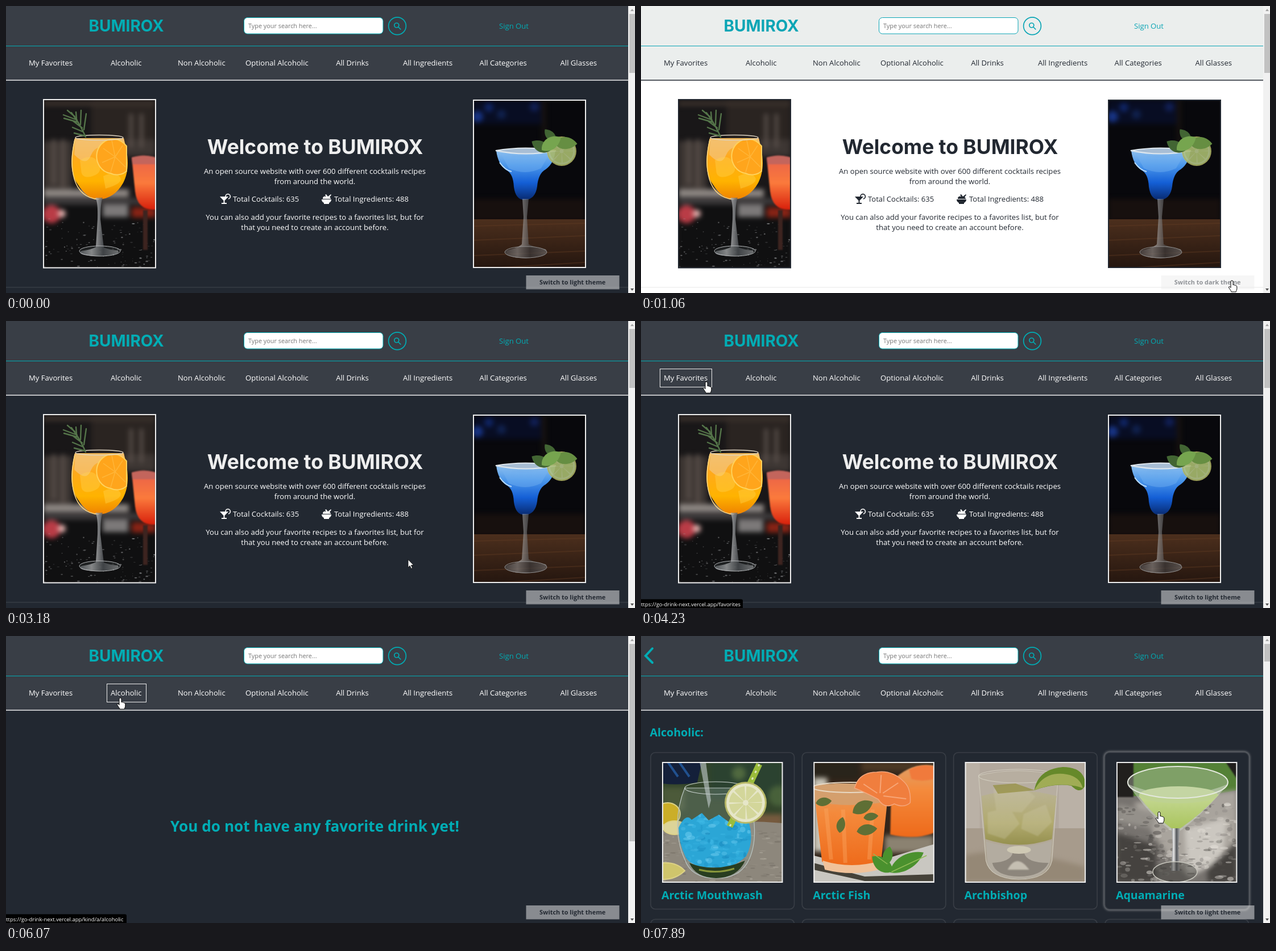
Recreate the animation shown at these times as an HTML page. Size 1106 by 506 pixels, loop 8000 ms.

```html
<!DOCTYPE html>
<html lang="en">
<head>
<meta charset="utf-8">
<title>Cocktail site demo</title>
<style>
html, body { margin: 0; width: 100%; height: 100%; overflow: hidden; }
#stage {
  --head: #393e46; --body: #222831; --ink: #eee; --text: #fff; --accent: #00adb5; --rule: #41464e;
  display: block; font: 13.1px "Open Sans", sans-serif;
}
#stage.light { --head: #ebeeed; --body: #fff; --ink: #222831; --text: #222831; --accent: #0aa5b5; --rule: #e8e8e8; }
.head { fill: var(--head); }
.body { fill: var(--body); }
.ink { fill: var(--ink); }
.text { fill: var(--text); }
.accent { fill: var(--accent); }
.line { fill: none; stroke: var(--accent); stroke-width: 1.7; }
.frame { fill: none; stroke: var(--ink); stroke-width: 2; }
.mid { text-anchor: middle; }
.brand { font: 700 28px Inter, sans-serif; }
.title { font: 700 35.4px Inter, sans-serif; }
.bold { font-weight: 700; font-size: 19.6px; }
.notice { font-weight: 700; font-size: 26.2px; }
.blur { filter: blur(4px); }
.soft { filter: blur(1.2px); }
.glow { fill: none; stroke: #b4b4b4; stroke-width: 3.5; filter: blur(2px); opacity: .8; }
</style>
</head>
<body>
<svg id="stage" width="1106" height="506" viewBox="0 0 1106 506">
  <defs>
    <linearGradient id="amber" x2="0" y2="1">
      <stop stop-color="#f3b95a"/><stop offset=".3" stop-color="#ffa91c"/><stop offset=".7" stop-color="#ffb300"/><stop offset="1" stop-color="#ee8200"/>
    </linearGradient>
    <linearGradient id="azure" x2="0" y2="1">
      <stop stop-color="#8fc0ee"/><stop offset=".3" stop-color="#4a96ea"/><stop offset=".65" stop-color="#145fd6"/><stop offset="1" stop-color="#082a70"/>
    </linearGradient>
    <linearGradient id="red" x2="0" y2="1">
      <stop stop-color="#e8604a"/><stop offset=".5" stop-color="#fb7a3c"/><stop offset="1" stop-color="#d8200c"/>
    </linearGradient>
    <linearGradient id="wood" x2="0" y2="1">
      <stop stop-color="#4c2f1d"/><stop offset="1" stop-color="#25160f"/>
    </linearGradient>
    <linearGradient id="peach" x2="0" y2="1">
      <stop stop-color="#e0a068"/><stop offset=".35" stop-color="#f48a3c"/><stop offset="1" stop-color="#ee6a1a"/>
    </linearGradient>
    <linearGradient id="lime" x2="0" y2="1">
      <stop stop-color="#cbdca0"/><stop offset="1" stop-color="#a9c45c"/>
    </linearGradient>
    <linearGradient id="olive" x2="0" y2="1">
      <stop stop-color="#b9b293"/><stop offset=".6" stop-color="#b1aa6e"/><stop offset="1" stop-color="#95904f"/>
    </linearGradient>
    <linearGradient id="stem">
      <stop stop-color="#777b80"/><stop offset=".3" stop-color="#e6e6e6"/><stop offset=".6" stop-color="#55585c"/><stop offset="1" stop-color="#b5b5b5"/>
    </linearGradient>
    <path id="leaf" d="M0 0C6-16 26-20 40-6C30 8 12 12 0 0Z"/>
    <clipPath id="slush"><path d="M29 116Q42 89 52 102L70 90 82 103 100 93 124 111 137 85 152 105Q163 138 148 166Q124 190 92 186Q55 188 42 169Q29 143 29 116Z"/></clipPath>
    <g id="slice">
      <circle r="37" fill="#b9b968"/><circle r="34" fill="#e6e6c8"/>
      <circle r="17" fill="none" stroke="#d3d69a" stroke-width="24" stroke-dasharray="11.4 2"/>
    </g>
  </defs>

  <rect class="body" width="1095" height="506"/>
  <rect class="head" width="1095" height="130"/>
  <rect class="accent" y="70" width="1095" height="1"/>
  <rect class="ink" y="130" width="1095" height="1.500"/>
  <text class="brand accent mid" x="211.5" y="45">BUMIROX</text>
  <rect x="418.500" y="20.500" width="244.500" height="28.500" rx="6" fill="#fff" stroke="var(--accent)"/>
  <text x="426" y="39" font-size="10.85" fill="#757575">Type your search here...</text>
  <circle class="line" cx="688" cy="35.200" r="15.400"/>
  <circle class="line" cx="686.800" cy="34" r="4"/>
  <path class="line" d="M689.800 37l4 4" stroke-linecap="round"/>
  <text class="accent" x="867" y="40">Sign Out</text>
  <g id="nav" class="text mid"></g>
  <rect id="navBox" y="84.500" height="32" fill="none" stroke="#eee"/>

  <g id="home">
    <svg x="66" y="165" width="197" height="297" viewBox="66 165 197 297">
      <rect x="66" y="165" width="197" height="297" fill="#191718"/>
      <g class="blur">
        <path d="M150 165h113v90H150z" fill="#2a2421"/>
        <path d="M66 172h197" stroke="#39302b" stroke-width="9"/>
        <path d="M66 238h50v95H66zM208 235h55v30h-55z" fill="#3d3633"/>
        <path d="M84 235v80M100 235v85M220 190v60M238 190v60" stroke="#5a504b" stroke-width="6"/>
        <path d="M66 323h150v14H66z" fill="#8d8783"/>
        <path d="M66 339h197v13H66z" fill="#3e3b3c"/>
        <path d="M66 350h197v112H66z" fill="#101011"/>
        <circle cx="80" cy="367" r="16" fill="#b93c46"/><circle cx="98" cy="366" r="7" fill="#e3b1ae"/>
        <path d="M170 350h45v22h-45z" fill="#7c7979"/>
        <path d="M221 355h42v18h-42z" fill="#872315"/>
      </g>
      <g id="counter"></g>
      <g class="soft">
        <path d="M221 267q22-5 42 0v92q-32 2-36-32z" fill="url(#red)"/>
        <path d="M221 267q22-7 42 0v12h-41z" fill="#c3655c"/>
        <path d="M241 360h8v70h-8z" fill="#3d2420"/>
      </g>
      <path d="M121 233C112 270 113 295 126 314Q143 341 163 341Q190 340 206 312C218 288 215 263 207 233Z" fill="url(#amber)"/>
      <path d="M122 233q42 9 85 0l2 13q-16 12-34 5t-26 13-29-2z" fill="#f4c376" opacity=".75"/>
      <path d="M130 272q22-14 32 4t-10 24-20-12zM171 300q20-10 29 1t-25 21z" fill="#ffd24e" opacity=".4"/>
      <path d="M212 247v44a25 25 0 0 1-28 4a27 29 0 0 1 7-60q11 0 21 12z" fill="#ffa51c" stroke="#ffd25c" stroke-width="2"/>
      <path d="M192 266l-21-15M192 266l-23 10M192 266l-8 27M192 266l18 18M192 266l13-20M192 266l-6-29" stroke="#ffc14c" stroke-width="1.500" opacity=".6"/>
      <ellipse cx="164" cy="232" rx="42" ry="4.500" fill="none" stroke="#ded4c2" stroke-width="1.400"/>
      <path d="M121 235C110 285 116 337 163 341" fill="none" stroke="#ffd782" stroke-width="1.500"/>
      <path d="M140 231Q132 211 115 188M134 215l-17-13M136 222l-19-8M131 209l1-25M125 201l-24-9M121 195l-13-11M137 218l4-28M127 205l-25-7M139 229l-19-5M124 199l-1-12" fill="none" stroke="#547449" stroke-width="2.400" stroke-linecap="round"/>
      <path d="M157 338h13q-4 8-4 38l6 50q10 4 25 5q7 8-35 10q-39-1-30-9q17-2 26-7l3-49q1-31-4-38z" fill="url(#stem)" opacity=".8"/>
      <ellipse cx="165" cy="432" rx="36" ry="9" fill="#33373a" fill-opacity=".4" stroke="#b5b8ba"/>
    </svg>
    <rect class="frame" x="66" y="165" width="197" height="296.500"/>

    <svg x="822" y="166" width="197" height="295" viewBox="822 166 197 295">
      <rect x="822" y="166" width="197" height="295" fill="#08080c"/>
      <g class="blur">
        <path d="M822 166h120v42H822z" fill="#080d23"/>
        <circle cx="829" cy="195" r="10" fill="#173383"/><circle cx="849" cy="179" r="8" fill="#0f2464"/>
        <circle cx="871" cy="191" r="8" fill="#10214e"/><circle cx="929" cy="178" r="8" fill="#111f55"/>
        <path d="M942 166h8v100h-8z" fill="#17120f"/>
        <path d="M822 340h197v40H822z" fill="#17100e"/>
      </g>
      <path d="M822 376h197v85H822z" fill="url(#wood)"/>
      <path d="M822 388l197-5M822 413l197-8M822 440l197-8M870 461l149-9" stroke="#633d24" stroke-width="2" opacity=".4"/>
      <path d="M862 255Q865 279 879 289Q892 295 893 319Q896 342 912 342Q931 341 934 318Q936 295 949 288Q964 277 966 255Z" fill="url(#azure)"/>
      <path d="M870 260q39 14 86 0l-15 26q-28 14-57 0z" fill="#79b5f0" opacity=".4"/>
      <path d="M861 255Q913 246 967 255Q914 266 861 255Z" fill="#a8bed5" stroke="#e0e8ee" stroke-width="2"/>
      <path d="M868 276q9 13 21 16" fill="none" stroke="#bcdcf8" stroke-width="2"/>
      <path d="M908 340h11l-3 32 3 48q8 5 30 9q10 13-35 16q-41-2-36-14q22-4 29-11l3-48z" fill="url(#stem)" opacity=".55"/>
      <ellipse cx="914" cy="434" rx="37" ry="10" fill="#271f1d" fill-opacity=".4" stroke="#8f8e8e"/>
      <g transform="translate(977 256) scale(.7)"><use href="#slice" opacity=".85"/><circle r="35" fill="#799944" opacity=".48"/></g>
      <g fill="#426533">
        <use href="#leaf" transform="translate(967 238) rotate(-125) scale(.7)"/><use href="#leaf" transform="translate(957 255) rotate(-145) scale(.9)"/>
        <use href="#leaf" transform="translate(964 242) rotate(10)" fill="#668e42"/><use href="#leaf" transform="translate(942 254) rotate(-25)" fill="#76a54f"/>
      </g>
    </svg>
    <rect class="frame" x="822" y="166" width="197" height="295"/>
    <text class="title ink mid" x="543.500" y="261">Welcome to BUMIROX</text>
    <g class="text">
      <g class="mid">
        <text x="543" y="296">An open source website with over 600 different cocktails recipes</text>
        <text x="543" y="314">from around the world.</text>
        <text x="543" y="377">You can also add your favorite recipes to a favorites list, but for</text>
        <text x="543" y="395">that you need to create an account before.</text>
      </g>
      <text x="399" y="345">Total Cocktails: 635</text>
      <text x="577" y="345">Total Ingredients: 488</text>
      <path d="M376 336h15l-6.500 7v4h3.500v2h-9v-2h3.500v-4z"/>
      <path d="M386 336a4.200 4.200 0 1 1 5 4" fill="none" stroke="var(--ink)" stroke-width="1.800"/>
      <path d="M555 341h17q0 4-4 6v2h-9v-2q-4-2-4-6zM557 340a4 4 0 0 1 6-4l-2-3 2-1 3 4 5-4 1 1-3 4q2 1 2 3z"/>
    </g>
    <rect y="495.500" width="1095" height="1" fill="var(--rule)"/>
  </g>

  <text id="favorites" class="notice accent mid" x="543" y="345">You do not have any favorite drink yet!</text>

  <g id="list">
    <path d="M20 22L8 35L20 47" fill="none" stroke="var(--accent)" stroke-width="4" stroke-linecap="round"/>
    <text class="accent bold" x="15.500" y="177">Alcoholic:</text>
    <g id="cards"></g>
    <svg x="37" y="222" width="212" height="212">
      <path d="M0 0h212v212H0z" fill="#33452b"/>
      <g class="blur">
        <path d="M85 0h127v65H85z" fill="#2b4230"/><circle cx="135" cy="20" r="12" fill="#50693f"/><circle cx="205" cy="60" r="18" fill="#48613a"/>
        <path d="M0 45h40v40H0z" fill="#4c5a3a"/><path d="M150 92h62v30h-62z" fill="#765a3e"/>
      </g>
      <path d="M0 0h70l-8 36q-32 6-62 2z" fill="#14203a"/><path d="M10 0l18 26M30 0l18 26" stroke="#21518f" stroke-width="4"/>
      <path d="M0 122Q100 98 212 108V212H0z" fill="#8d877c"/>
      <g id="cloth"></g>
      <g fill="#cbae28" stroke="#ddd286" stroke-width="2"><ellipse cx="10" cy="92" rx="22" ry="20"/><ellipse cx="22" cy="116" rx="20" ry="12" fill="#dcd498"/><path d="M0 178q26-2 40 14q-17 16-40 15z" fill="#cfc56c"/></g>
      <path d="M40 46C24 85 22 133 40 172Q51 205 96 205Q138 205 153 172C170 135 162 85 148 46Z" fill="#8fa39c" fill-opacity=".28" stroke="#b9c5c2" stroke-width="1.200"/>
      <g clip-path="url(#slush)"><path d="M0 60h212v140H0z" fill="#2ba6d6"/><g id="ice"></g></g>
      <path d="M48 178q45 19 98-4q-13 30-51 31-36-1-47-27z" fill="#283d20"/><path d="M65 190q32 8 62-2" stroke="#88963b" stroke-width="3" fill="none"/>
      <ellipse cx="94" cy="46" rx="54" ry="11" fill="none" stroke="#c9d2ce" stroke-width="1.200"/>
      <path d="M66 0h11l4 30 5 38-4 14-6-30z" fill="#c3cdce" opacity=".6"/>
      <path d="M171 4L119 114" stroke="#9abc3b" stroke-width="11"/><path d="M171 4L119 114" stroke="#dfe8bf" stroke-width="3" stroke-dasharray="4 9"/>
      <use href="#slice" x="147" y="72"/>
    </svg>
    <svg x="303.300" y="222" width="212" height="212">
      <path d="M0 0h212v212H0z" fill="#33251a"/>
      <g class="blur"><path d="M0 0h80v30H0z" fill="#29241b"/><path d="M85 0h127v16H85z" fill="#4c3925"/><path d="M0 28h24v130H0z" fill="#c9c5b8"/><path d="M125 130h87v30h-87z" fill="#8b8271"/></g>
      <path d="M0 165L80 185 212 145V212H0z" fill="#c9c7c1"/><path d="M0 190l90 20h122v-12L90 202 0 178z" fill="#454239"/>
      <path class="soft" d="M137 35Q170 0 212 7V125Q180 138 135 128Z" fill="url(#peach)"/>
      <path class="soft" d="M168 14Q190 2 212 8V30Q190 36 172 30Z" fill="#f07a3c"/>
      <path d="M0 43Q62 31 132 48L119 175Q65 194 15 176Z" fill="url(#peach)"/>
      <path d="M0 43Q62 31 132 48L128 70Q65 82 2 70Z" fill="#d0a273" opacity=".8"/>
      <path d="M22 82l9 90M52 84l4 94M104 84l-6 88" stroke="#fba863" stroke-width="7" opacity=".4"/>
      <ellipse cx="65" cy="45" rx="67" ry="9" fill="none" stroke="#e8d9c4" stroke-width="2"/>
      <path d="M16 174q52 16 102 0l-3 16q-47 12-95 0z" fill="#f0c29a"/>
      <path d="M72 46Q80 18 111 18Q138 14 158 34Q172 46 170 72Q159 82 142 74Q125 84 114 66Q92 54 72 46Z" fill="#f07e3e" stroke="#f5a67c" stroke-width="1.500"/>
      <path d="M112 55l-24-16M117 55l2-32M122 55l27-18M123 60l40 5" stroke="#f7a677" stroke-width="2"/>
      <g fill="#5f6f35"><use href="#leaf" transform="translate(4 73) scale(.7)"/><use href="#leaf" transform="translate(69 90) rotate(-20)"/><use href="#leaf" transform="translate(88 99) scale(.65)"/><use href="#leaf" transform="translate(46 125) rotate(-70) scale(.7)"/><use href="#leaf" transform="translate(76 123) scale(.9)"/></g>
      <g fill="#4a912e"><use href="#leaf" transform="translate(135 195) rotate(-25) scale(1.700 1.200)"/><use href="#leaf" transform="translate(139 193) rotate(-135) scale(1.100)"/><use href="#leaf" transform="translate(128 181) rotate(-70) scale(.8)"/></g>
      <path d="M137 194l62-29M130 180l-25-18" stroke="#91bc57" stroke-width="1.500"/>
    </svg>
    <svg x="569.600" y="222" width="212" height="212">
      <path d="M0 0h212v212H0z" fill="#b2a89d"/><path d="M0 0h26v117H0zM165 40h47v77h-47z" fill="#bab1a6"/>
      <path d="M0 117h212v95H0z" fill="#a79b8c"/><path class="blur" d="M0 165q70-20 212 20v27H0z" fill="#958876"/>
      <path d="M24 24Q92 7 164 24L153 174Q146 207 94 207Q44 205 37 174Z" fill="#bdb5a4" fill-opacity=".5" stroke="#cdc8ba" stroke-width="1.200"/>
      <path d="M29 60Q94 42 161 60L153 136Q95 156 36 136Z" fill="url(#olive)"/>
      <g class="soft" fill="#cfcaaa" opacity=".3">
        <path d="M50 48l43-10 31 23-24 28-45-3zM40 89l38-9 18 29-26 27-30-10zM103 92l39-17 11 31-25 25-29-13z"/>
      </g>
      <path d="M49 41l40-3 34 12-65 6z" fill="#938d3c" opacity=".7"/>
      <ellipse cx="94" cy="25" rx="70" ry="12" fill="none" stroke="#d3cec0" stroke-width="1.200"/>
      <path d="M37 140q58 18 116-1l-3 36q-8 31-56 32-50-3-55-32z" fill="#b3aca0"/>
      <path d="M48 178Q81 176 84 160h20q4 18 43 18q-12 24-52 24-42-1-47-24z" fill="#8d867c"/><path class="soft" d="M75 190q16-30 38 0z" fill="#c5bfb2"/>
      <ellipse cx="95" cy="155" rx="21" ry="7" fill="#cfc9b4"/>
      <path d="M122 50Q128 13 172 9Q210 9 212 40Q204 59 187 42Q158 37 122 50Z" fill="#66892a"/><path d="M122 50Q138 18 173 21Q202 24 207 46Q166 32 122 50Z" fill="#a0ac55"/>
    </svg>
    <svg x="835.900" y="222" width="212" height="212">
      <path d="M0 0h212v212H0z" fill="#77736f"/><path d="M0 0h212v50L110 70 0 56z" fill="#548136"/><path class="soft" d="M0 0h30v62H0zM192 0l20 30V0z" fill="#211f1d"/>
      <g class="blur"><path d="M30 72L212 50V150L130 205 90 165z" fill="#a9a49d"/><path d="M120 118l75-20-10 80-60 22z" fill="#cbc7c0"/><path d="M0 125l70 22v65H0zM160 190l52-50v72h-52z" fill="#45423f"/><path d="M4 75l65 15-5 28-64-13z" fill="#94908a"/></g>
      <g id="wicker"></g>
      <path d="M20 39Q58 94 96 121H113Q155 90 196 39Q109 76 20 39Z" fill="#ccd6c4" opacity=".55"/>
      <path d="M39 60Q107 31 180 58Q150 91 114 116Q104 123 94 115Q62 91 39 60Z" fill="url(#lime)"/>
      <ellipse cx="109" cy="58" rx="69" ry="15" fill="#bed291"/>
      <ellipse cx="108" cy="36" rx="88" ry="28" fill="#cfdbc4" fill-opacity=".35" stroke="#e4e8de" stroke-width="2"/>
      <path d="M97 117h15l-3 30 2 45H96l3-45z" fill="url(#stem)"/><ellipse cx="103" cy="194" rx="39" ry="18" fill="#393833" fill-opacity=".45" stroke="#c7c6bd" stroke-width="1.500"/>
    </svg>
    <g id="borders"></g>
  </g>

  <g id="button" opacity=".5">
    <rect x="914.500" y="475" width="164" height="24.500"/>
    <text class="mid" x="996.200" y="491.300" style="font-weight:700;font-size:10.9px"></text>
  </g>
  <g id="status">
    <path fill="#000"/>
    <text x="-5.500" y="503" font-size="9.450" fill="#fff"></text>
  </g>
  <rect x="1094" width="12" height="506" fill="#f1f1f1"/>
  <rect id="thumb" x="1096" y="14" width="10" fill="#c1c1c1"/>
  <path d="M1098 9l3-4 3 4z" fill="#a3a3a3"/><path d="M1098 498l3 4 3-4z" fill="#505050"/>
  <path id="hand" fill="#fff" stroke="#000" d="M-2 1a2 2 0 0 1 4 0v6c1-1 2.400-.6 2.600.5 1-.7 2.200-.2 2.400.8 1-.3 1.800.4 1.800 1.400v4c0 2-1.500 3-1.500 5.300h-8.300c0-2-3.200-5-4.600-8 .3-2 2-1.800 3.600.6z"/>
  <path id="arrow" fill="#fff" stroke="#000" stroke-width=".8" d="M0 0v14l3.200-3 2.200 5 2.200-1-2.200-5h4.400z"/>
</svg>

<script>
const LOOP = 8000;
const TO_LIGHT = 1000, TO_DARK = 2600, TO_FAVORITES = 4350, TO_LIST = 6820;
const BUTTON_DELAY = 50, BUTTON_FADE = 430;
const URL_BASE = "https://go-drink-next.vercel.app/";
const THUMB = { home: 104, favorites: 348, list: 31 };

// time, x, y of the pointer tip
const PATH = [
  [460, 1098, 500], [600, 1039, 485], [2980, 1039, 485], [3180, 708, 421],
  [3740, 158, 150], [3880, 115, 108], [5260, 115, 108], [5460, 204, 102],
  [5930, 204, 102], [6070, 201, 110], [7340, 201, 110], [7890, 911, 311]
];
// appears, gone, page path, bar width
const STATUS = [[4000, 4700, "favorites", 179], [5660, 7070, "kind/a/alcoholic", 212]];

const $ = id => document.getElementById(id);
const stage = $("stage");
const clamp = v => Math.max(0, Math.min(1, v));
const show = (el, on) => { el.style.display = on ? "" : "none"; };

function add(parent, tag, attrs, text = "") {
  const el = document.createElementNS(stage.namespaceURI, tag);
  for (const key in attrs) el.setAttribute(key, attrs[key]);
  el.textContent = text;
  return parent.appendChild(el);
}

const navItems = ["My Favorites", "Alcoholic", "Non Alcoholic", "Optional Alcoholic",
  "All Drinks", "All Ingredients", "All Categories", "All Glasses"]
  .map((label, i) => add($("nav"), "text", { x: 78.6 + 132.6 * i, y: 105 }, label));

const glows = ["Arctic Mouthwash", "Arctic Fish", "Archbishop", "Aquamarine"].map((name, i) => {
  const x = 17 + 266.3 * i;
  const box = { x, y: 205.5, width: 252.5, height: 276, rx: 8 };
  const card = { ...box, fill: "#222831", stroke: "#393e46", "stroke-width": 1.6 };
  const glow = add($("cards"), "rect", { ...box, class: "glow" });
  add($("cards"), "rect", card);
  add($("cards"), "rect", { ...card, y: 499.5 });
  add($("cards"), "text", { x: x + 19, y: 464, class: "accent bold" }, name);
  add($("borders"), "rect", { x: x + 21, y: 223, width: 210.5, height: 211, class: "frame" });
  return glow;
});

let seed = 7;
const random = () => (seed = seed * 16807 % 2147483647) / 2147483647;

// Scatters small ellipses over a box to give a surface its grain.
function scatter(id, count, [x, y, w, h], rx, ry, colors) {
  for (let i = 0; i < count; i++) {
    add($(id), "ellipse", {
      cx: x + w * random(), cy: y + h * random(),
      rx: rx * (0.3 + random()), ry: ry * (0.3 + random()),
      fill: colors[i % colors.length], opacity: 0.15 + 0.4 * random()
    });
  }
}
scatter("counter", 130, [66, 375, 197, 85], 2, 1, ["#a9abad"]);
scatter("cloth", 160, [0, 122, 212, 90], 5, 1.2, ["#b4aea2", "#6e685f"]);
scatter("ice", 150, [28, 85, 130, 105], 6, 4, ["#6fcdf0", "#1787bb", "#3fb9e6"]);
scatter("wicker", 260, [0, 75, 212, 137], 6, 3, ["#e0dcd5", "#4a4744", "#8f8b86"]);

function pointerAt(t) {
  const next = PATH.findIndex(p => p[0] > t);
  if (next < 0) return PATH[PATH.length - 1].slice(1);
  if (next === 0) return null;
  const [t0, x0, y0] = PATH[next - 1], [t1, x1, y1] = PATH[next];
  const k = (t - t0) / (t1 - t0);
  return [x0 + (x1 - x0) * k, y0 + (y1 - y0) * k];
}

function inside(p, x, y, w, h) {
  return !!p && p[0] >= x && p[0] <= x + w && p[1] >= y && p[1] <= y + h;
}

function navRect(item) {
  const w = item.getComputedTextLength() + 14;
  return [+item.getAttribute("x") - w / 2, 84, w, 33];
}

function mix(a, b, k) {
  return `rgb(${a.map((v, i) => Math.round(v + (b[i] - v) * k))})`;
}

function drawButton(t, light) {
  const pale = [238, 238, 238], dark = [34, 40, 49];
  const ease = start => {
    const k = clamp((t - start - BUTTON_DELAY) / BUTTON_FADE);
    return k * k * (3 - 2 * k);
  };
  const k = ease(TO_LIGHT) - ease(TO_DARK);
  const [face, label] = $("button").children;
  face.style.fill = mix(pale, dark, k);
  label.style.fill = mix(dark, pale, k);
  label.textContent = `Switch to ${light ? "dark" : "light"} theme`;
}

function drawStatus(t) {
  const entry = STATUS.find(s => t >= s[0] && t < s[1]);
  show($("status"), entry);
  if (!entry) return;
  const [from, to, path, width] = entry;
  const [bar, label] = $("status").children;
  bar.setAttribute("d", `M0 490.500H${width - 3}q3 0 3 3V506H0z`);
  label.textContent = URL_BASE + path;
  $("status").style.opacity = Math.min(clamp((t - from + 70) / 140), clamp((to - t) / 140));
}

function drawPointer(t, page) {
  const p = pointerAt(t);
  const nav = navItems.find(item => inside(p, ...navRect(item)));
  const card = page === "list" ? glows.findIndex((g, i) => inside(p, 17 + 266.3 * i, 205, 253, 277)) : -1;
  const link = nav || card >= 0 || inside(p, 914, 475, 164, 25);

  show($("navBox"), nav && page !== "list");
  if (nav) {
    const [x, , w] = navRect(nav);
    $("navBox").setAttribute("x", Math.round(x) + 0.5);
    $("navBox").setAttribute("width", Math.round(w));
  }
  glows.forEach((g, i) => show(g, i === card));
  show($("hand"), p && link);
  show($("arrow"), p && !link);
  if (p) for (const id of ["hand", "arrow"]) $(id).setAttribute("transform", `translate(${p})`);
}

function draw(t) {
  const light = t >= TO_LIGHT && t < TO_DARK;
  const page = t < TO_FAVORITES ? "home" : t < TO_LIST ? "favorites" : "list";
  stage.classList.toggle("light", light);
  for (const id in THUMB) show($(id), id === page);
  $("thumb").setAttribute("height", THUMB[page]);
  drawButton(t, light);
  drawStatus(t);
  drawPointer(t, page);
}

const start = performance.now();
function tick() {
  draw((performance.now() - start) % LOOP);
  requestAnimationFrame(tick);
}
tick();
</script>
</body>
</html>
```
